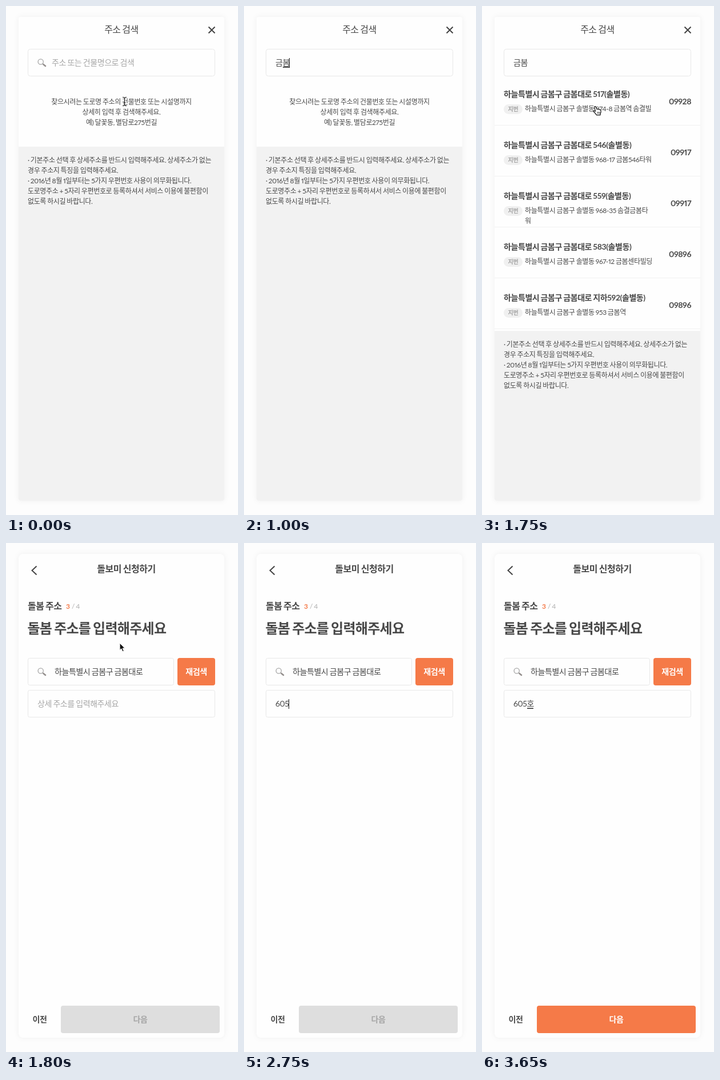
Recreate the animation shown at these times as an HTML page. Size 406 by 890 pixels, loop 3750 ms.

```html
<!DOCTYPE html>
<html lang="ko">
<head>
<meta charset="utf-8">
<title>주소 검색</title>
<style>
html, body { margin: 0; width: 100%; height: 100%; overflow: hidden; background: #fdfdfd; }
svg { display: block; width: 406px; height: 890px; }
text {
  font-family: Lato, 'Noto Sans CJK KR', 'Noto Sans CJK', sans-serif;
  font-variant-numeric: lining-nums proportional-nums;
  letter-spacing: -.03em;
  word-spacing: -.05em;
  fill: #484848;
  white-space: pre;
}
.card { fill: #fefefe; filter: drop-shadow(0 0 5px rgba(0, 0, 0, .055)); }
.field { fill: #fefefe; stroke: #e8e8e8; }
.rule { stroke: #f1f1f1; }
.icon { fill: none; stroke: #444; stroke-width: 2; }
</style>
</head>
<body>
<svg viewBox="0 0 406 890" id="stage"></svg>
<script>
const LOOP = 3750, STEP = 50;
const ORANGE = [245, 122, 72], GREY = [222, 222, 222], DIM = [166, 166, 166], WHITE = [255, 255, 255];
const stage = document.getElementById('stage');

function add(parent, tag, attrs, content) {
  const node = document.createElementNS('http://www.w3.org/2000/svg', tag);
  for (const key in attrs) node.setAttribute(key, attrs[key]);
  if (content) node.textContent = content;
  parent.append(node);
  return node;
}
const group = (parent, attrs = {}) => add(parent, 'g', attrs);
const box = (parent, x, y, width, height, rx, attrs) =>
  add(parent, 'rect', { x, y, width, height, rx, ...attrs });
const path = (parent, d, attrs) => add(parent, 'path', { d, ...attrs });

// Text is placed by the vertical middle of its line.
function label(parent, text, x, middle, size, { weight = 400, anchor = 'start', fill } = {}) {
  const node = add(parent, 'text', {
    x, y: middle + size * .37, 'font-size': size, 'font-weight': weight, 'text-anchor': anchor
  }, text);
  if (fill) node.style.fill = fill;
  return node;
}

function magnifier(parent, y) {
  const g = group(parent, { transform: `translate(55 ${y})`, fill: 'none' });
  add(g, 'circle', { cx: 5.7, cy: 5.5, r: 4.6, stroke: '#a5a5a5', 'stroke-width': 1.3 });
  path(g, 'M9 9L10.7 10.5', { stroke: '#999', 'stroke-width': 1.3 });
  path(g, 'M10.6 10.2L14 13', { stroke: '#948f8d', 'stroke-width': 2.6, 'stroke-linecap': 'round' });
  return g;
}

// Text entry: finished text, an underlined syllable in progress, and a caret.
function entry(parent, middle) {
  const text = label(parent, '', 55, middle, 14);
  const line = box(parent, 0, middle + 7.3, 0, 1.6, 0, { fill: '#333' });
  const caret = box(parent, 0, middle - 8, 1, 17, 0, { fill: '#111' });
  const measure = s => { text.textContent = s; return s ? text.getComputedTextLength() : 0; };
  return (done, composing, caretOn) => {
    const start = measure(done), end = measure(done + composing);
    line.setAttribute('x', 55.5 + start);
    line.setAttribute('width', composing ? Math.max(0, end - start - 1.5) : 0);
    caret.setAttribute('x', Math.round(55 + end - (end ? .6 : 0)));
    caret.style.display = caretOn ? '' : 'none';
  };
}

// Search page
const search = group(stage);
box(search, 22, 19, 360, 846, 4, { class: 'card' });
label(search, '주소 검색', 202, 41, 16, { weight: 500, anchor: 'middle' });
path(search, 'M354.5 36.5L365.5 47.5M365.5 36.5L354.5 47.5', { class: 'icon' });
box(search, 38.5, 75.5, 327, 47, 4, { class: 'field' });
const hint = group(search);
magnifier(hint, 92);
label(hint, '주소 또는 건물명으로 검색', 80, 99, 14, { fill: '#a6a6a6' });

const guide = group(search);
['찾으시려는 도로명 주소의 건물번호 또는 시설명까지', '상세히 입력 후 검색해주세요.', '예) 달꽃동, 별담로275번길']
  .forEach((s, i) => label(guide, s, 202, 167.5 + 18 * i, 12, { anchor: 'middle' }));

const CITY = '하늘특별시 금봄구';
const results = group(search);
[
  ['517', ['974-8 금봄역 솜결빌'], '09928'],
  ['546', ['968-17 금봄546타워'], '09917'],
  ['559', ['968-35 솜결금봄타', '워'], '09917'],
  ['583', ['967-12 금봄센타빌딩'], '09896'],
  ['지하592', ['953 금봄역'], '09896']
].forEach(([number, [lot, rest], zip], i) => {
  const row = group(results, { transform: `translate(0 ${89 * i})` });
  label(row, `${CITY} 금봄대로 ${number}(솔별동)`, 38, 154, 14, { weight: 700 });
  box(row, 38, 172, 33, 17, 8.5, { fill: '#f0f0f0' });
  label(row, '지번', 54.5, 180.3, 10, { weight: 700, anchor: 'middle', fill: '#a3a3a3' });
  label(row, `${CITY} 솔별동 ${lot}`, 75, 179.5, 12);
  if (rest) label(row, rest, 75, 197.5, 12);
  label(row, zip, 366, 167, 14, { weight: 700, anchor: 'end' });
  path(row, 'M22 208.5H382', { class: 'rule' });
});

const notice = group(search);
const noticeBack = path(notice, '', { fill: '#f2f2f2' });
const noticeText = group(notice);
[
  '· 기본주소 선택 후 상세주소를 반드시 입력해주세요. 상세주소가 없는',
  '경우 주소지 특징을 입력해주세요.',
  '· 2016년 8월 1일부터는 5가지 우편번호 사용이 의무화됩니다.',
  '도로명주소 + 5자리 우편번호로 등록하셔서 서비스 이용에 불편함이',
  '없도록 하시길 바랍니다.'
].forEach((s, i) => label(noticeText, s, 38, 269.5 + 18 * i, 12));
const showQuery = entry(search, 99);

// Form page
const form = group(stage);
box(form, 22, 19, 360, 846, 8, { class: 'card' });
path(form, 'M53.5 40.5L45.5 48L53.5 55.5', { class: 'icon' });
label(form, '돌보미 신청하기', 210.5, 45, 16, { weight: 700, anchor: 'middle' });
label(form, '돌봄 주소', 38, 110, 16, { weight: 700 });
label(form, '3', 105, 110.5, 12, { weight: 700, fill: `rgb(${ORANGE})` });
label(form, '/ 4', 115, 110.5, 12, { fill: '#b0b0b0' });
label(form, '돌봄 주소를 입력해주세요', 37.5, 149, 24, { weight: 700 });
box(form, 38.5, 201.5, 255, 47, 3, { class: 'field' });
magnifier(form, 218);
label(form, `${CITY} 금봄대로`, 85, 225, 14);
box(form, 300, 201, 66, 48, 4, { fill: `rgb(${ORANGE})` });
label(form, '재검색', 333, 225, 14, { weight: 700, anchor: 'middle', fill: '#fff' });
box(form, 38.5, 257.5, 327, 47, 3, { class: 'field' });
const detailHint = label(form, '상세 주소를 입력해주세요', 55, 281, 14, { fill: '#a6a6a6' });
const showDetail = entry(form, 281);
label(form, '이전', 59, 833, 14, { weight: 700, anchor: 'middle' });
const next = box(form, 96, 809, 278, 48, 4);
const nextText = label(form, '다음', 235, 833, 14, { weight: 700, anchor: 'middle' });

// Pointers, each drawn around its hot spot
const pointer = group(stage);
const shapes = { beam: group(pointer), hand: group(pointer), arrow: group(pointer) };
const beam = 'M-3.5 -7.5Q0 -7.5 0 -5Q0 -7.5 3.5 -7.5M0 -5.5V5.5M-3.5 7.5Q0 7.5 0 5Q0 7.5 3.5 7.5M-2 2H2';
path(shapes.beam, beam, { fill: 'none', stroke: '#fff', 'stroke-width': 2.6 });
path(shapes.beam, beam, { fill: 'none', stroke: '#111', 'stroke-width': 1.2 });
path(shapes.hand,
  'M-2.6 2Q-2.4 .2 -.8 .6Q0 .9 .5 2.2L1.8 5.6Q2.8 4.3 4.1 5.6Q5.3 4.8 6.3 6.2Q8.3 5.8 8.8 8' +
  'Q9.5 11 8 13L7.8 15.6H1.2Q-.5 12.8 -3.8 9.8Q-4.5 8 -2.6 8.2L-.7 9.2Z',
  { fill: '#fff', stroke: '#111', 'stroke-width': 1.2, 'stroke-linejoin': 'round' });
path(shapes.hand, 'M3 10V13.5M5 10V13.5M7 10V13.5', { stroke: '#111', 'stroke-width': .8 });
path(shapes.arrow, 'M0 0V12.4L2.8 9.8L4.9 14.8L7.2 13.8L5.1 9H9Z',
  { fill: '#111', stroke: '#fff', 'stroke-width': 1, 'stroke-linejoin': 'round' });

// Timelines
const moves = [[0, 207.5, 167], [250, 209.5, 102], [1250, 209.5, 102], [1500, 200, 175], [1850, 199, 175], [2150, 202, 282]];
const queryKeys = [[0, '', ''], [400, '', 'ㄱ'], [750, '', '그'], [800, '', '금'], [850, '금', 'ㅂ'],
  [900, '금', '보'], [1000, '금', '봄'], [1700, '금봄', '']];
const detailKeys = [[0, '', ''], [2500, '6', ''], [2600, '60', ''], [2700, '605', ''],
  [2800, '605', 'ㅎ'], [2850, '605', '호']];
const carets = [[150, 650], [750, 1250], [1500, 1700], [2200, 2450], [2500, 3150], [3400, 3650]];

const at = (keys, t) => keys.filter(k => k[0] <= t).pop();
const show = (node, on) => { node.style.display = on ? '' : 'none'; };
const mix = (a, b, p) => `rgb(${a.map((v, i) => Math.round(v + (b[i] - v) * p))})`;

function position(t) {
  const from = at(moves, t), to = moves[moves.indexOf(from) + 1] || from;
  const p = to === from ? 0 : (t - from[0]) / (to[0] - from[0]);
  const eased = p * p * (3 - 2 * p);
  return [1, 2].map(i => from[i] + (to[i] - from[i]) * eased);
}

function drawPointer(t) {
  const [x, y] = position(t);
  show(pointer, t < 400 || t >= 1250 && t < 2500);
  pointer.setAttribute('transform', `translate(${x} ${y})`);
  const onForm = t >= 1800;
  const kind = onForm ? (y > 257 ? 'beam' : 'arrow') : (t >= 1250 && y > 123 ? 'hand' : 'beam');
  for (const name in shapes) show(shapes[name], name === kind);
}

function draw(t) {
  const onForm = t >= 1800, found = t >= 1200;
  const caretOn = carets.some(([a, b]) => t >= a && t < b);
  show(search, !onForm);
  show(form, onForm);
  if (onForm) {
    const [, done, composing] = at(detailKeys, t);
    show(detailHint, !done);
    showDetail(done, composing, caretOn);
    const ready = Math.min(1, Math.max(0, (t - 2750) / 200));
    next.style.fill = mix(GREY, ORANGE, ready);
    nextText.style.fill = mix(DIM, WHITE, ready);
  } else {
    const [, done, composing] = at(queryKeys, t);
    show(hint, !(done + composing));
    show(guide, !found);
    show(results, found);
    noticeBack.setAttribute('d', `M22 ${found ? 568 : 246}H382V861Q382 865 378 865H26Q22 865 22 861Z`);
    noticeText.setAttribute('transform', `translate(0 ${found ? 322 : 0})`);
    showQuery(done, composing, caretOn);
  }
  drawPointer(t);
}

function tick() {
  draw(Math.floor(performance.now() % LOOP / STEP) * STEP);
  requestAnimationFrame(tick);
}
tick();
</script>
</body>
</html>
```
